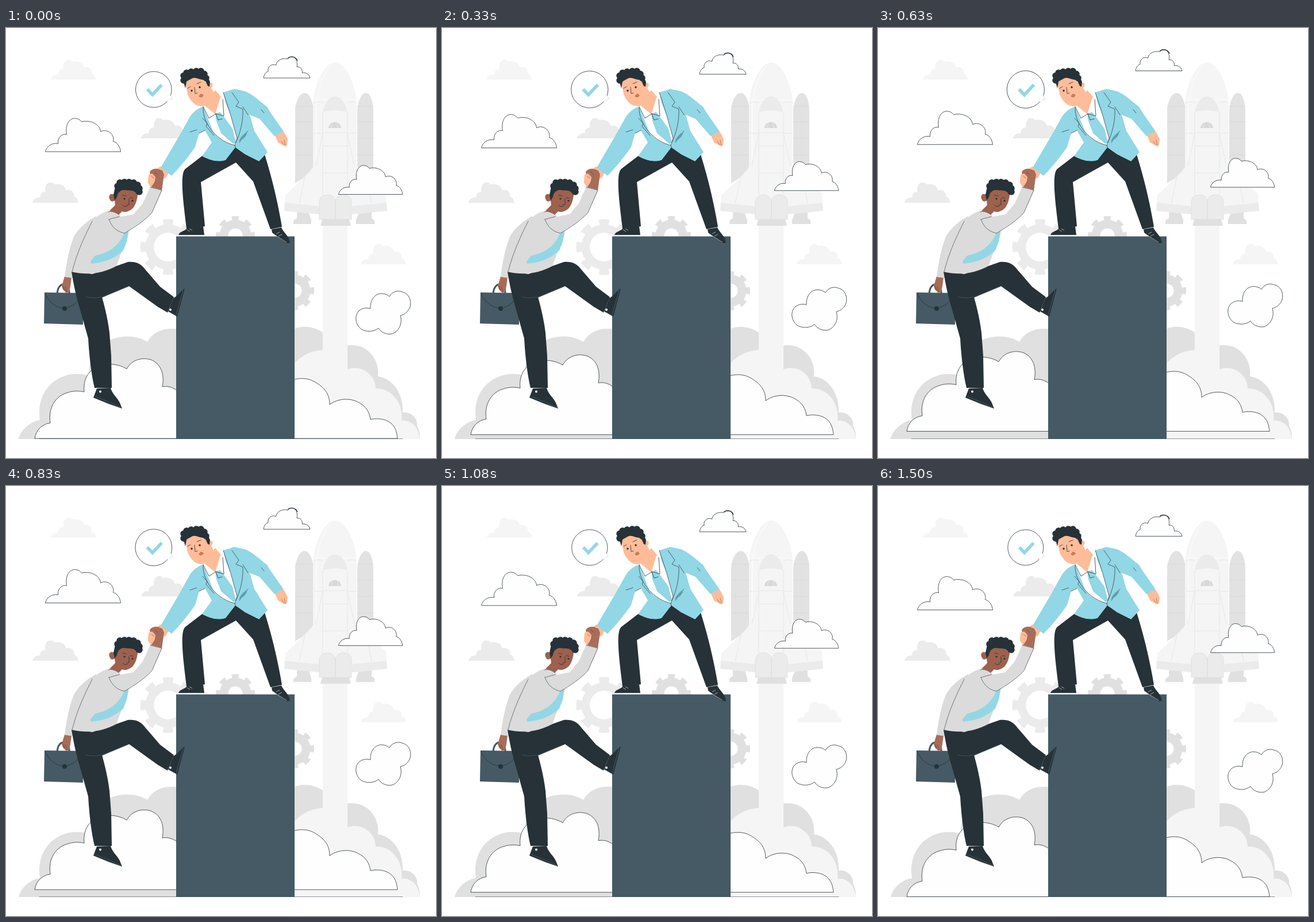
An HTML page for the animation above (1540 ms loop, 748 by 748 pixels).

```html
<!DOCTYPE html>
<html lang="en">
<head>
<meta charset="utf-8">
<title>Helping hand</title>
<style>
  html, body { margin: 0; width: 100%; height: 100%; overflow: hidden; background: #fff; }
  svg { display: block; width: 100vw; height: 100vh; stroke-width: .8; }
  .line { fill: none; stroke: #263238; stroke-linecap: round; stroke-linejoin: round; }
  .soft { fill: none; stroke: #e3e3e3; }
  .float { fill: #fefefe; stroke: #263238; }
  .dark { fill: #263238; }
  .slate { fill: #455a64; }
  .cyan { fill: #92d7e5; }
  .shirt { fill: #dbdbdb; }
  .brown { fill: #9d614e; }
  .fist { fill: #a96c59; }
  .peach { fill: #ffbc98; }
  .curls { fill: none; stroke: #263238; stroke-width: 11.5; stroke-linecap: round; }
  .g1 { fill: #f5f5f5; }
  .g2 { fill: #ebebeb; }
  .g3 { fill: #e0e0e0; }
</style>
</head>
<body>
<svg viewBox="0 0 748 748">
  <defs>
    <path id="cloud" vector-effect="non-scaling-stroke" d="M0 58C2 48 12 42 22 44C21 33 29 26 37 28C34 12 41 0 51 0C57 0 61 3 63 6C78 2 95 10 96 23C109 17 121 29 118 40C126 42 130 50 131 58Z"/>
    <g id="gear">
      <circle r="39.500" stroke="none"/>
      <circle r="43.500" fill="none" stroke-width="10" pathLength="80" stroke-dasharray="5 5" stroke-dashoffset="2.5"/>
    </g>
  </defs>

  <!-- sky -->
  <use href="#cloud" class="g1" transform="translate(78 55) scale(.6)"/>
  <use href="#cloud" class="g2" transform="translate(235 156.500) scale(.61)"/>
  <use href="#cloud" class="g2" transform="translate(46 268.500) scale(.61)"/>
  <use href="#cloud" class="g1" transform="translate(617 375.500) scale(.6 .61)"/>

  <!-- launch smoke -->
  <path class="g3" d="M490 529C507 517 533 516 553 531V650H490ZM590 553C625 545 651 574 647 606C672 609 692 636 690 669C705 667 717 680 715 692C719 699 720 705 720 712H590Z"/>
  <path class="g1" d="M551 344H594V594C618 584 643 604 643 627C669 626 692 651 688 683C706 681 719 697 720 715H495V594C504 576 524 562 551 560Z"/>

  <!-- shuttle -->
  <path fill="#e2e2e2" d="M503 270V142C505 123 513 113 519 113C527 113 533 123 535 142V250ZM611 250V142C613 123 620 113 626 113C633 113 638 124 639 142V270Z"/>
  <path d="M503 136H535M503 163H535M503 192H535M503 221H535M611 136H639M611 163H639M611 192H639M611 221H639" fill="none" stroke="#d6d6d6"/>
  <path class="g1" d="M534 262V131C537 95 555 60 573 60C590 60 608 95 610 131V262Z"/>
  <path d="M540 240V134C542 104 552 80 566 64M536 125H609" fill="none" stroke="#fbfbfb" stroke-width="1.500"/>
  <path class="soft" d="M535 131C540 128 546 128 551 130M594 130C600 128 606 128 610 131M535 183H551M594 183H610"/>
  <path class="g3" d="M506 319H526L531 334V341H500V335L506 331ZM615 319H636V331L641 335V341H609V334Z"/>
  <path class="g1" d="M551 180C547 224 538 242 520 258L486 291L484 318L545 324H602L663 318L661 288L627 258C608 241 599 224 594 180Z"/>
  <path class="g2" d="M485 304L545 310V324L484 318ZM602 310L662 304L663 318L602 324Z"/>
  <path class="g1" d="M551 300V150C553 130 562 119 572 119C583 119 592 130 594 150V300Z"/>
  <path class="g2" d="M551 147C555 128 563 119 572 119C582 119 591 129 594 147C580 142 564 142 551 147Z"/>
  <path class="soft" d="M551 147V290M594 147V290M551 182H594M551 205H594M551 252H594M551 184L539 240M594 184L606 240M520 258L510 305M627 258L636 305"/>
  <path fill="#d8d8d8" d="M561 174C562 160 582 160 583 174Z"/>
  <path d="M568 164L566 174M576 164L578 174" stroke="#eee"/>
  <path class="g3" d="M551 330H596L600 344H547Z"/>
  <path class="g2" stroke="#dedede" d="M545 333V302C546 294 552 290 559 290C567 290 573 295 573 302V333ZM573 333V302C574 294 580 290 587 290C595 290 601 295 601 302V333Z"/>

  <!-- ground smoke -->
  <path class="g3" d="M22 715C26 698 42 685 59 682C54 649 68 618 100 606C116 600 134 601 145 606C141 580 155 553 180 543C200 534 226 534 246 546C256 528 276 520 300 524V715Z"/>
  <path class="line" d="M58 714.500H690" stroke-width=".5"/>

  <!-- gears -->
  <use href="#gear" fill="#ebebeb" stroke="#ebebeb" transform="translate(282 381)"/>
  <use href="#gear" fill="#e0e0e0" stroke="#e0e0e0" transform="translate(399 361) scale(.7)"/>
  <use href="#gear" fill="#e0e0e0" stroke="#e0e0e0" transform="translate(502 457) scale(.7)"/>
  <g fill="#fff">
    <circle cx="282" cy="381" r="25"/>
    <circle cx="399" cy="361" r="12.500"/>
    <circle cx="502" cy="457" r="12.500"/>
  </g>

  <!-- drifting clouds -->
  <g id="drift" class="float">
    <use href="#cloud" transform="translate(68.500 157.200)"/>
    <use href="#cloud" transform="translate(529 50) scale(-.618 .638)"/>
    <use href="#cloud" transform="translate(578.500 239) scale(.85 .87)"/>
    <path d="M634 488C633 474 641 462 653 462C659 462 664 464 667 467C672 458 682 456 689 459C704 462 708 482 699 492C695 497 691 499 686 500C690 514 684 527 672 532C661 534 652 529 648 522C640 529 627 529 618 524C607 515 606 500 614 492C620 487 627 486 634 488Z"/>
    <path d="M50 714C52 700 62 689 77 687C73 662 85 640 108 634C117 631 127 631 136 633C133 605 150 587 175 585C190 584 202 588 210 593C218 578 235 572 252 577C270 584 276 603 272 624C283 622 291 626 300 632V714Z"/>
    <path d="M490 615C510 607 527 608 541 618C557 628 563 640 563 655C573 647 590 643 606 648C622 654 632 664 634 681C645 678 661 680 669 687C677 693 680 703 681 714H490Z"/>
    <path d="M490 52.500C496 48.500 504 49.500 507 57" fill="none" stroke-width="1.400"/>
  </g>

  <!-- tick bubble -->
  <g id="tick">
    <path class="line" d="M280.500 127.500A31.300 31.300 0 1 1 286.500 117"/>
    <path class="line" d="M286.500 117L289.500 123L283.500 125" stroke-opacity=".2"/>
    <path d="M245.700 106.500L254.700 116L270.700 99" fill="none" stroke="#92d7e5" stroke-width="5.500"/>
  </g>

  <rect class="slate" x="296" y="362.500" width="206" height="352.500"/>

  <!-- climber -->
  <g>
    <path d="M89 462C90 450 96 445 102 446C107 447 110 452 110 461" fill="none" stroke="#455a64" stroke-width="3"/>
    <path class="slate" d="M67 460L134 461V516L66 514Z"/>
    <path class="line" d="M68 462C75 478 88 487 101 487C118 486 125 476 131 465"/>
    <circle class="dark" cx="102" cy="488" r="4"/>
    <path class="fist" d="M102 432L114 434L112 449L110 459L105 461L99 455L97 449Z"/>
    <path class="line" d="M103 450L106 459M99 449L102 456" stroke-width=".5"/>
    <path class="shirt" d="M157 327C138 338 126 349 118 363C109 386 105 410 102 433L116 435L132 400L158 350Z"/>
    <path class="dark" d="M114 424C118 447 120 459 129 490L143 540C145 575 149 605 154 626H184L183 570L180 530C177 506 172 486 167 468L160 430Z"/>
    <path class="dark" d="M117 423L150 428L192 414L212 407C226 406 235 410 243 421L268 450L292 468L281 495L264 485L214 449L167 469C150 471 136 473 122 463Z"/>
    <path d="M139 468Q152 471 166 468M167 468L214 449" fill="none" stroke="#455a64"/>
    <path class="dark" d="M291 470C299 466 304 457 311 453L298 502L282 493Z"/>
    <path class="dark" d="M158 627L182 626C184 636 194 643 198 652L202 662L179 654L152 643Z"/>
    <path d="M308 456L296 499M155 641L180 651L200 660" fill="none" stroke="#60717a" stroke-width=".6"/>
    <circle cx="286" cy="490" r="2" fill="#fff"/>
    <circle cx="164" cy="632.500" r="2" fill="#fff"/>

    <path class="shirt" d="M150 336C160 325 172 318 183 318L197 324L214 350C213 366 208 377 201 390L192 414C170 426 145 431 114 424C122 395 133 367 150 336Z"/>
    <path class="cyan" d="M213 351L210 372L204 387C188 402 170 408 148 410L147 406L155 396C180 391 196 379 205 358Z"/>
    <path class="fist" d="M252 278L259 258L274 258L271 283Z"/>
    <path class="shirt" d="M180 332L222 324L238 305L251 276L272 282L254 321C243 334 222 348 205 357C195 354 186 346 180 332Z"/>
    <path class="line" d="M179 333L197 328M179 333C184 346 192 354 206 357C222 348 243 334 254 321L271 282L251 277M150 336C139 358 124 388 115 424M178 320C184 318 190 320 196 324" stroke-width=".6"/>
    <path class="brown" d="M190 284L188 290C181 286 177 293 181 299C183 303 187 302 189 300L190 308L180 318C185 320 191 321 196 325L202 319C208 322 216 318 221 313C226 307 228 298 229 291L228 276H194Z"/>
    <path class="dark" d="M187 290L189 300L193 294C194 286 200 281 207 282C215 284 223 280 228 290L235 288L234 276L222 268H200L190 276Z"/>
    <path class="curls" d="M194 275h.01M198 269h.01M206 268h.01M214 268h.01M222 269h.01M229 273h.01M232 279h.01M232 285h.01" stroke-width="11"/>
    <path class="line" d="M203 291L209 292M216 295L221 296M214 297V307L210 308M203 308Q206 312 211 310"/>
    <circle class="dark" cx="206" cy="297" r="1.600"/>
    <circle class="dark" cx="220" cy="300.500" r="1.600"/>
  </g>

  <!-- helper -->
  <g>
    <path class="peach" d="M268 241L286 246L278 261L262 264L252 277L247 269L248 257Z"/>
    <path class="peach" d="M468 187L483 180L490 193L489 204L485 206L473 199Z"/>
    <path class="line" d="M484 195L486 204M479 197L483 203" stroke-width=".4"/>
    <path class="dark" d="M342 222L312 245C302 253 308 300 314 349L346 345L339 268L400 234L430 267L460 350L480 346C475 315 465 268 450 220L400 204Z"/>
    <path class="dark" d="M316 347L343 345L345 360H300C302 353 312 354 316 347ZM462 350L479 347C483 357 493 361 494 374H487L463 356Z"/>
    <path d="M298 361H345" stroke="#f5f5f5" stroke-width="1.500"/>
    <path d="M315 351L320 354M319 349L324 352M470 358L476 355M474 362L480 359M463 357L488 373" fill="none" stroke="#c5cbce"/>
    <path fill="#fff" d="M343 136L378 119L392 150L402 197L398 204L368 189L350 164Z"/>
    <path class="peach" d="M345 132L352 148L364 152L370 140L376 122L364 108Z"/>
    <path fill="#fff" d="M343 137L347 136L364 150L373 121L379 119L380 149L366 147L360 158L352 152Z"/>
    <path class="cyan" d="M364 150L372 146L378 153L394 175L400 199L396 202L374 183L366 162Z"/>
    <path class="line" d="M343 137L353 157L365 149L379 153L377 124M365 149L369 160L376 158"/>
    <path class="cyan" d="M343 137C333 139 323 148 318 158L300 190L269 243L288 257C302 243 319 222 329 207L336 183L346 178L358 199L341 223C356 231 369 234 382 230L399 208L416 220L440 232L455 216L432 179L424 151L441 158L467 188L483 180L460 147L454 137C440 126 428 115 416 110L397 106L378 112L382 130L391 152L402 192L398 204C384 201 370 193 361 182Z"/>
    <path class="dark" d="M341 223C356 231 369 234 382 230L399 208L416 220L440 232L437 235L401 212L384 233C370 237 354 234 341 225Z"/>
    <path class="line" d="M343 137C342 154 350 170 361 182C372 193 384 201 398 204M342 157L350 166L348 171L362 187M378 112L391 152L402 192L398 204L399 208M393 112L405 129L400 136L412 141C413 162 407 184 400 199M406 199Q412 188 421 179M421 151L412 137M320 181L332 177M444 142L449 148M346 178L336 183" stroke-width=".7"/>
    <path d="M405 197Q409 187 420 180Q418 192 405 197Z" fill="#5e9fac"/>
    <path class="peach" d="M312 95L316 115C320 126 329 137 341 136C350 135 359 129 365 119L357 104C363 98 358 92 352 97L345 84L317 86Z"/>
    <path class="dark" d="M312 105L308 91L316 75L340 75L352 87L355 94L354 102L351 101L346 90C336 91 330 84 323 88L314 93Z"/>
    <path class="curls" d="M309 91h.01M309 83h.01M314 78h.01M322 76h.01M331 75h.01M339 75h.01M345 80h.01M348 87h.01"/>
    <path class="line" d="M316 105L321 102M332 97L339 94M328 103L329 114L333 113"/>
    <circle class="dark" cx="323" cy="109" r="1.700"/>
    <circle class="dark" cx="337" cy="103" r="1.700"/>
    <path d="M336 119C338 114 341 114 343 117C342 120 339 121 336 119Z" fill="#d18250" stroke="#8a4b2c" stroke-width=".6"/>
  </g>

  <!-- clasped fist -->
  <path class="fist" d="M250 251C252 246 258 244 264 245L272 248L275 255L273 268L271 281L254 277L259 266L260 259L252 258Z"/>
  <path class="peach" d="M248 255L254 253L259 258L258 268L253 272L247 270Z"/>
  <path class="line" d="M253 258L257 261M259 250L264 255" stroke-width=".5"/>
</svg>
<script>
  const LOOP = 1540, STEPS = 37;
  const rise = [[0, 0], [17, -14.1], [36, .4], [37, 0]];
  const pulse = [[0, 1], [11, 1.035], [15, 1.04], [28, .985], [36, .99], [37, 1]];
  const drift = document.getElementById('drift');
  const tick = document.getElementById('tick');

  function sample(track, x) {
    const i = track.findIndex(([at], n) => n && at >= x);
    const [x0, y0] = track[i - 1], [x1, y1] = track[i];
    return y0 + (y1 - y0) * (x - x0) / (x1 - x0);
  }

  function draw() {
    // 24 poses per second, held between steps
    const t = performance.now() % LOOP;
    const step = Math.min(STEPS - 1, Math.floor((t + 5) / LOOP * STEPS));
    drift.setAttribute('transform', `translate(0 ${sample(rise, step)})`);
    tick.setAttribute('transform', `translate(256.5 108) scale(${sample(pulse, step)}) translate(-256.5 -108)`);
    requestAnimationFrame(draw);
  }
  draw();
</script>
</body>
</html>
```
